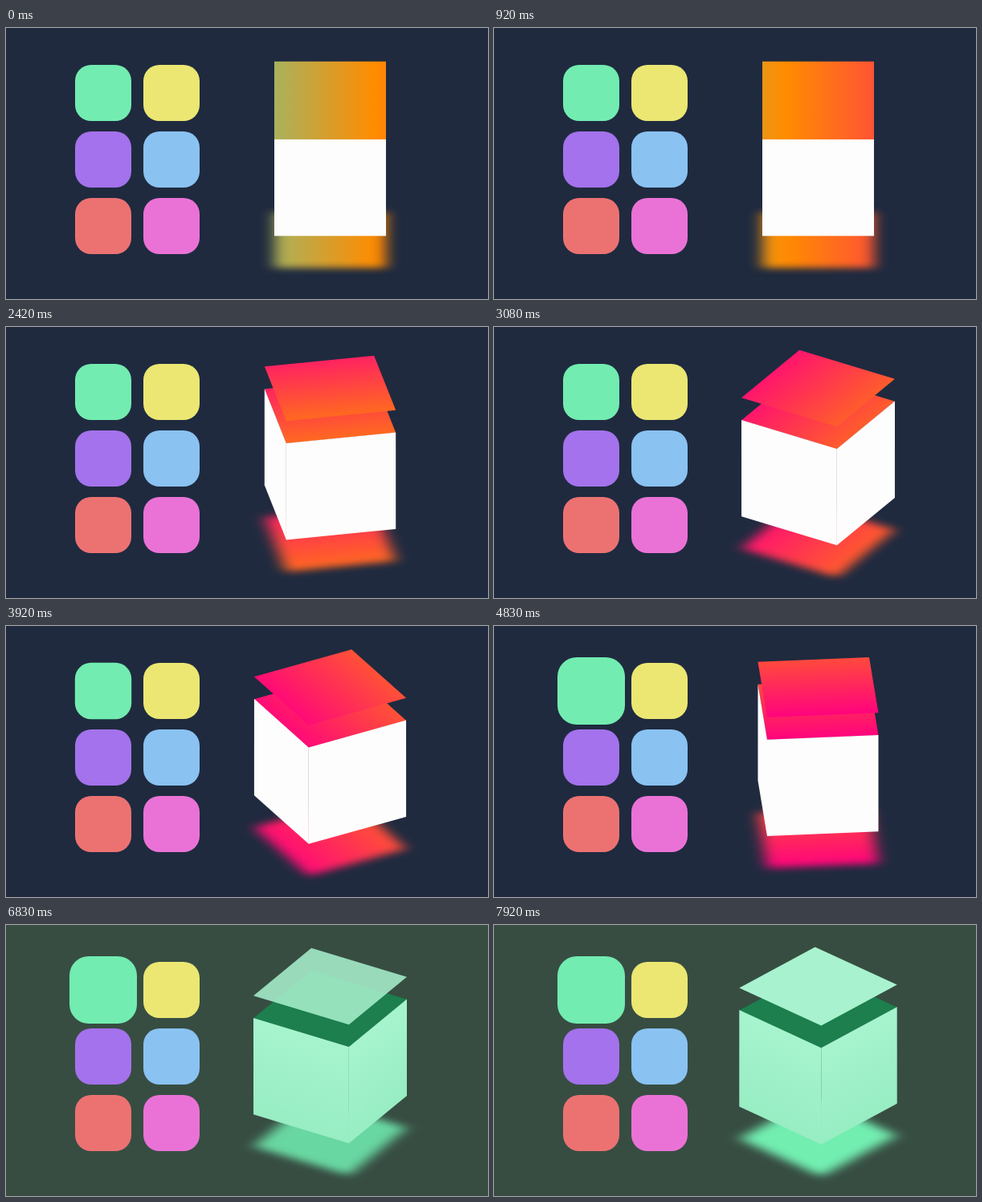
Write an HTML page that moves like this. It is 600 by 338 pixels and loops after 8 s.

```html
<!DOCTYPE html>
<html lang="en">
<head>
<meta charset="utf-8">
<title>Colour picker cube</title>
<style>
  html, body { margin: 0; width: 100%; height: 100%; overflow: hidden; }
  #stage { position: relative; width: 600px; height: 338px; overflow: hidden; background: #1f2a3f; }
  #stage div { position: absolute; }
  .swatch { width: 70px; height: 70px; border-radius: 20px; }
  .plane, .side { width: 139px; height: 139px; }
  .plane {
    left: 334px;
    background-image: linear-gradient(90deg, #40e0d0, #ff8c00, #ff0080);
    background-size: 400% 100%;
  }
  #shadow { top: 194.5px; filter: blur(9px); }
  #top { top: 34.7px; }
  #lid { top: 6.5px; }
  .side { left: 0; top: 0; transform-origin: 0 0; background: #fdfdfd; }
  .picked { background: #374d42 !important; }
  .picked .plane { background-image: none; }
  .picked .side { background: linear-gradient(#a6f4ce, #98edc3); }
  .picked #top { background-color: #1c7f4d; }
</style>
</head>
<body>
<div id="stage">
  <div id="shadow" class="plane"></div>
  <div id="top" class="plane"></div>
  <div id="front" class="side"></div>
  <div id="right" class="side"></div>
  <div id="lid" class="plane"></div>
</div>
<script>
const LOOP = 8000;
const HALF = 69.5, CENTER_X = 403.5, TOP_Y = 104.2;
const TILT = 0.5, RISE = Math.sqrt(3) / 2;   // 30 degree view from above
const SPIN_START = 1015, SPIN_SPEED = 72 / 1000;
const GRADIENT_START = -1850, GRADIENT_TIME = 8000;
const HOVER_AT = 3900, PICK_AT = 6550, TRANSITION = 500;

const $ = id => document.getElementById(id);
const stage = $('stage');
const planes = [...document.querySelectorAll('.plane')];

const swatches = ['#72ecb0', '#ebe772', '#a472ec', '#8ac2f2', '#ec7272', '#ea72d6'].map((color, i) => {
  const el = document.createElement('div');
  el.className = 'swatch';
  el.style.cssText = `background:${color};left:${85.7 + 85.3 * (i % 2)}px;top:${45.8 + 83.3 * (i >> 1)}px`;
  return stage.appendChild(el);
});

// CSS "ease": cubic-bezier(.25, .1, .25, 1), solved by bisection
function ease(x) {
  if (x <= 0) return 0;
  if (x >= 1) return 1;
  const bezier = (a, b, s) => 3 * a * s * (1 - s) ** 2 + 3 * b * s * s * (1 - s) + s ** 3;
  let lo = 0, hi = 1;
  for (let i = 0; i < 24; i++) {
    const mid = (lo + hi) / 2;
    if (bezier(0.25, 0.25, mid) < x) lo = mid; else hi = mid;
  }
  return bezier(0.1, 1, lo);
}

function placeSide(el, localX, localY, dx, dy, c, s) {
  const x = CENTER_X + HALF * (localX * c - localY * s);
  const y = TOP_Y + HALF * (localX * s + localY * c) * TILT;
  el.style.transform = `matrix(${dx}, ${dy * TILT}, 0, ${RISE}, ${x}, ${y})`;
}

function draw(t) {
  const angle = -Math.max(0, t - SPIN_START) * SPIN_SPEED;
  const shift = 100 * ease((t - GRADIENT_START) / GRADIENT_TIME);
  for (const plane of planes) {
    plane.style.transform = `scaleY(${TILT}) rotate(${angle}deg)`;
    plane.style.backgroundPosition = `${shift}% 0`;
  }

  // The cube repeats every quarter turn, so two side faces are enough.
  const a = ((angle % 90) + 90) % 90 * Math.PI / 180;
  const c = Math.cos(a), s = Math.sin(a);
  placeSide($('front'), -1, 1, c, s, c, s);
  placeSide($('right'), 1, 1, s, -c, c, s);

  swatches[0].style.transform = `scale(${1 + 0.2 * ease((t - HOVER_AT) / TRANSITION)})`;

  const fade = ease((t - PICK_AT) / TRANSITION);
  stage.classList.toggle('picked', t >= PICK_AT);
  $('lid').style.backgroundColor = `rgba(168, 242, 207, ${fade})`;
  $('shadow').style.backgroundColor = `rgba(114, 238, 177, ${fade})`;
}

function frame() {
  draw(performance.now() % LOOP);
  requestAnimationFrame(frame);
}
frame();
</script>
</body>
</html>
```
